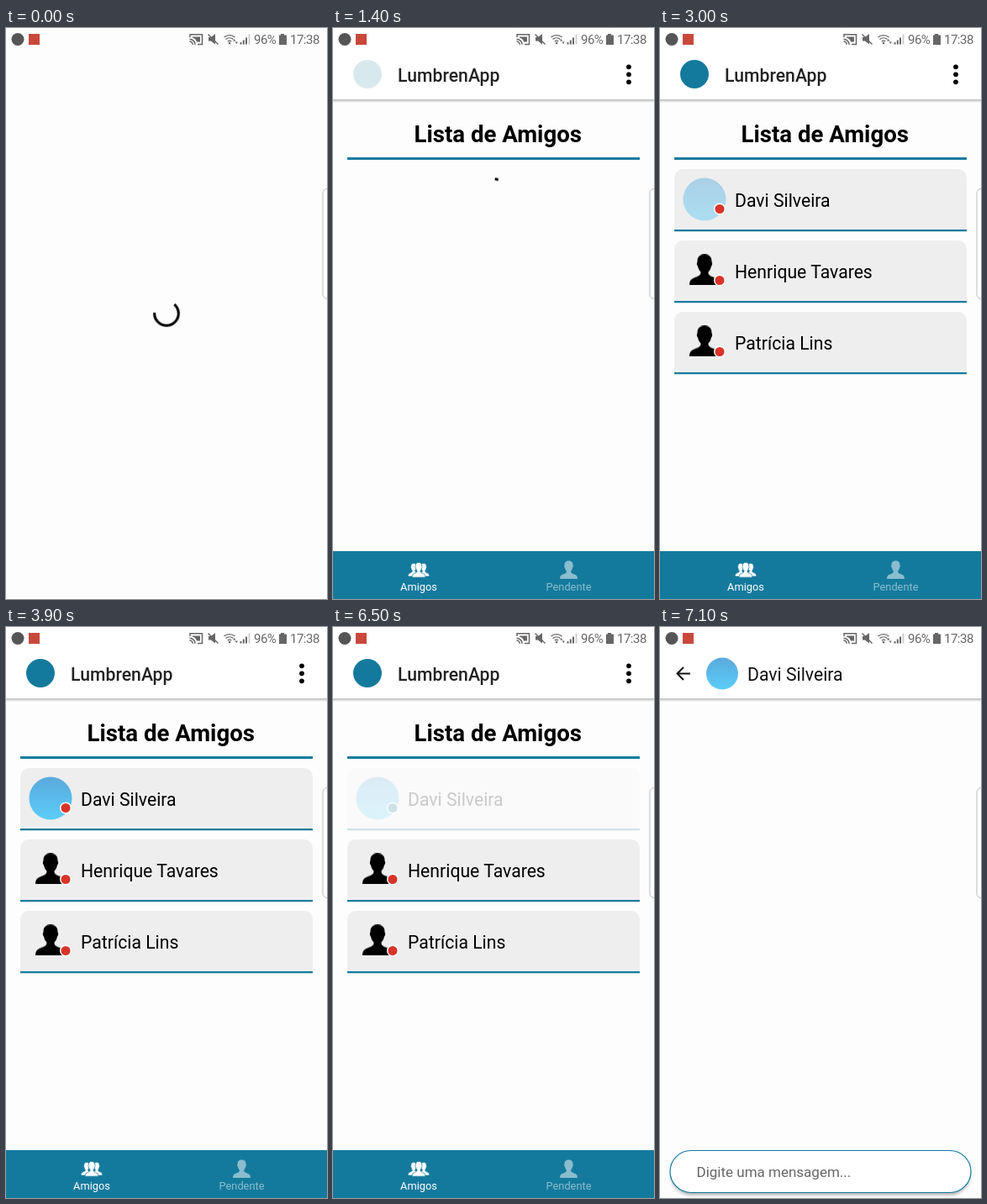
Animation of 382 by 680 pixels, one loop 8000 ms. Source, as an HTML page:

```html
<!DOCTYPE html>
<html lang="pt">
<head>
<meta charset="utf-8">
<title>Lista de Amigos</title>
<style>
  html, body { margin: 0; width: 100%; height: 100%; overflow: hidden; background: #fdfdfd; }
  svg { display: block; width: 382px; height: 680px; }
  text { font-family: Roboto, sans-serif; font-size: 21.2px; }
  .teal { fill: #147a9d; }
  .title { font-weight: 500; fill: #222; }
  .heading { font-size: 27.6px; font-weight: 700; }
  .tab { font-size: 12.8px; fill: #fff; text-anchor: middle; }
  .clock { font-size: 15px; letter-spacing: -.5px; fill: #666; }
  .hint { font-size: 17px; fill: #666; }

  .timed { animation: 8s linear infinite both; }
  .home { animation-name: home; animation-timing-function: step-end; }
  .list { animation-name: list; animation-timing-function: step-end; }
  .logo { animation-name: logo; }
  .icon { animation-name: icon; }
  .photo { animation-name: photo; }
  .press { animation-name: press; }
  .badge { animation-name: badge; animation-timing-function: step-end; }
  .chat { animation-name: chat; }
  @keyframes home { 0% { opacity: 0 } 16.8%, 100% { opacity: 1 } }
  @keyframes list { 0% { opacity: 0 } 32.5%, 100% { opacity: 1 } }
  @keyframes logo { 0%, 16.9% { opacity: 0 } 20.7%, 100% { opacity: 1 } }
  @keyframes icon { 0%, 32.5% { opacity: 0 } 36.2%, 100% { opacity: 1 } }
  @keyframes photo { 0%, 35.8% { opacity: 0 } 39.6%, 100% { opacity: 1 } }
  @keyframes press {
    0% { opacity: 1; animation-timing-function: step-end }
    81.1%, 83.6% { opacity: .2 }
    86.8%, 100% { opacity: 1 }
  }
  @keyframes badge { 0% { fill: #d93429 } 81.1%, 100% { fill: #147a9d } }
  @keyframes chat {
    0%, 83.5% { opacity: 0; transform: translateY(50px); animation-timing-function: cubic-bezier(.2, .7, .3, 1) }
    88.4%, 100% { opacity: 1; transform: none }
  }

  /* Each spinner starts its own cycle at --at */
  .spin { animation: turn 8s linear var(--at) infinite; }
  .spin circle {
    fill: none; stroke: #000; stroke-width: 3.1; stroke-dasharray: 3 97;
    animation: trim 1333.333ms cubic-bezier(.4, 0, .2, 1) var(--at) infinite,
               shift 1333.333ms linear var(--at) infinite;
  }
  @keyframes turn { to { transform: rotate(360deg) } }
  @keyframes shift { to { transform: rotate(90deg) } }
  @keyframes trim {
    0% { stroke-dasharray: 3 97; stroke-dashoffset: 0 }
    50% { stroke-dasharray: 78 22; stroke-dashoffset: 0 }
    100% { stroke-dasharray: 3 97; stroke-dashoffset: -75 }
  }
  .first, .second, .third { animation-timing-function: step-end; }
  .first { animation-name: first; }
  .second { animation-name: second; }
  .third { animation-name: third; }
  @keyframes first { 0% { opacity: 1 } 16.8%, 100% { opacity: 0 } }
  @keyframes second { 0% { opacity: 0 } 16.8% { opacity: 1 } 21.7%, 100% { opacity: 0 } }
  @keyframes third { 0% { opacity: 0 } 21.7% { opacity: 1 } 32.5%, 100% { opacity: 0 } }
</style>
</head>
<body>
<svg viewBox="0 0 382 680">
  <defs>
    <linearGradient id="sky" x2="0" y2="1">
      <stop stop-color="#5aa9dc"/><stop offset="1" stop-color="#5bcdf8"/>
    </linearGradient>
    <linearGradient id="shade" x2="0" y2="1">
      <stop stop-color="#000" stop-opacity=".27"/><stop offset="1" stop-color="#000" stop-opacity="0"/>
    </linearGradient>
    <filter id="soft" x="-10%" y="-30%" width="120%" height="170%"><feGaussianBlur stdDeviation="2"/></filter>
    <path id="person" d="M-18 18C-18 11-15 10-10 8C-6 6.500-4.500 5.500-4.500 2C-7 0-7.500-3-8-5C-9.500-6-9.500-9-8.500-10C-9-16-5-19 0-19S9-16 8.500-10C9.500-9 9.500-6 8-5C7.500-3 7 0 4.500 2C4.500 5.500 6 6.500 10 8C15 10 18 11 18 18Z"/>
    <g id="card">
      <path d="M17 242V178a10 10 0 0 1 10-10H355a10 10 0 0 1 10 10V242Z" fill="#eee"/>
      <path class="teal" d="M17 240H365v2.300H17Z"/>
    </g>
    <circle id="dot" cx="71" cy="215.500" r="6.300" stroke="#fff" stroke-width="1.500"/>
    <g id="bar">
      <rect y="85" width="382" height="4" fill="url(#shade)"/>
      <rect width="382" height="85" fill="#fff"/>
    </g>
  </defs>

  <rect width="382" height="680" fill="#fdfdfd"/>
  <g class="timed first" transform="translate(191 340) rotate(-90)">
    <g class="spin" style="--at:-360ms"><circle r="14.300" pathLength="100"/></g>
  </g>

  <g class="timed home">
    <use href="#bar"/>
    <circle class="timed logo teal" cx="41" cy="55" r="17"/>
    <text class="title" x="77" y="64">LumbrenApp</text>
    <circle cx="352" cy="46.300" r="2.900"/><circle cx="352" cy="55.300" r="2.900"/><circle cx="352" cy="64.300" r="2.900"/>
    <text class="heading" x="96.500" y="136">Lista de Amigos</text>
    <rect class="teal" x="17" y="154" width="348" height="3"/>

    <g class="timed second" transform="translate(191 194) rotate(-90)">
      <g class="spin" style="--at:1340ms"><circle r="14.300" pathLength="100"/></g>
    </g>
    <g class="timed third" transform="translate(191 194) rotate(-90)">
      <g class="spin" style="--at:1736ms"><circle r="14.300" pathLength="100"/></g>
    </g>

    <g class="timed list">
      <g class="timed press">
        <use href="#card"/>
        <circle class="timed photo" cx="53" cy="204" r="25.500" fill="url(#sky)"/>
        <use class="timed badge" href="#dot"/>
        <text x="89" y="212.500">Davi Silveira</text>
      </g>
      <g transform="translate(0 85)">
        <use href="#card"/>
        <use class="timed icon" href="#person" x="53" y="203.500"/>
        <use href="#dot" fill="#d93429"/>
        <text x="89" y="212.500">Henrique Tavares</text>
      </g>
      <g transform="translate(0 170)">
        <use href="#card"/>
        <use class="timed icon" href="#person" x="53" y="203.500"/>
        <use href="#dot" fill="#d93429"/>
        <text x="89" y="212.500">Patrícia Lins</text>
      </g>
    </g>

    <rect class="teal" y="623" width="382" height="57"/>
    <g fill="#fff" stroke="#147a9d" stroke-width="1.500">
      <use href="#person" transform="translate(96 645.500) scale(.37 .42)"/>
      <use href="#person" transform="translate(108 645.500) scale(.37 .42)"/>
      <use href="#person" transform="translate(102 645.500) scale(.44 .48)"/>
    </g>
    <text class="tab" x="102" y="670.300">Amigos</text>
    <g opacity=".5">
      <use href="#person" fill="#fff" transform="translate(280.500 645.500) scale(.58)"/>
      <text class="tab" x="280.500" y="670.300">Pendente</text>
    </g>
  </g>

  <g class="timed chat">
    <rect width="382" height="680" fill="#fdfdfd"/>
    <use href="#bar"/>
    <path d="M36 55.500H21M28 48l-7.500 7.500 7.500 7.500" fill="none" stroke="#111" stroke-width="2"/>
    <circle cx="74" cy="55.500" r="19" fill="url(#sky)"/>
    <text x="104" y="64" fill="#111">Davi Silveira</text>
    <rect x="13" y="627" width="356" height="49" rx="24.500" opacity=".35" filter="url(#soft)"/>
    <rect x="12" y="623.500" width="358" height="50" rx="25" fill="#fff" stroke="#147a9d" stroke-width="1.200"/>
    <text class="hint" x="43.500" y="654.500">Digite uma mensagem...</text>
  </g>

  <rect x="377" y="191.500" width="16" height="131" rx="5" fill="#fff" stroke="#bbb"/>

  <g fill="#666">
    <circle cx="14" cy="13.500" r="7.500" fill="#555"/>
    <rect x="27" y="7" width="13" height="13" fill="#c8493b"/>
    <g fill="none" stroke="#666" stroke-width="1.500">
      <path d="M219 11V7.700H233.500V19.500H228M218.500 13.200a6.500 6.500 0 0 1 6.500 6.500M218.500 16a3.700 3.700 0 0 1 3.700 3.700"/>
      <path d="M259.500 11a10 10 0 0 1 13 0M261.500 13.500a7 7 0 0 1 9 0M263.800 16a3.700 3.700 0 0 1 4.500 0" stroke-width="1.300"/>
      <path d="M240.500 7.500 252.500 19.500" stroke-width="1.400"/>
    </g>
    <path d="M222 10.500h9v6h-4q-1-4-5-4.700Z"/>
    <path d="M241 11h3l5-4V19.500l-5-4h-3Z"/>
    <circle cx="266" cy="18" r="1.300"/>
    <path d="M270 15.500l1.700-2.500 1.700 2.500ZM272.500 16.500h3.400l-1.700 2.500Z"/>
    <path d="M278.500 17h2v2.500h-2ZM281.800 14.500h2v5h-2ZM285 11.500h2v8h-2Z"/>
    <path d="M288.600 7.500h1.700v12h-1.700Z" opacity=".35"/>
    <path d="M327 7h4v1.500h3V20h-9V8.500h2Z"/>
    <text class="clock" x="295" y="19">96%</text>
    <text class="clock" x="338" y="19">17:38</text>
  </g>
</svg>
</body>
</html>
```
